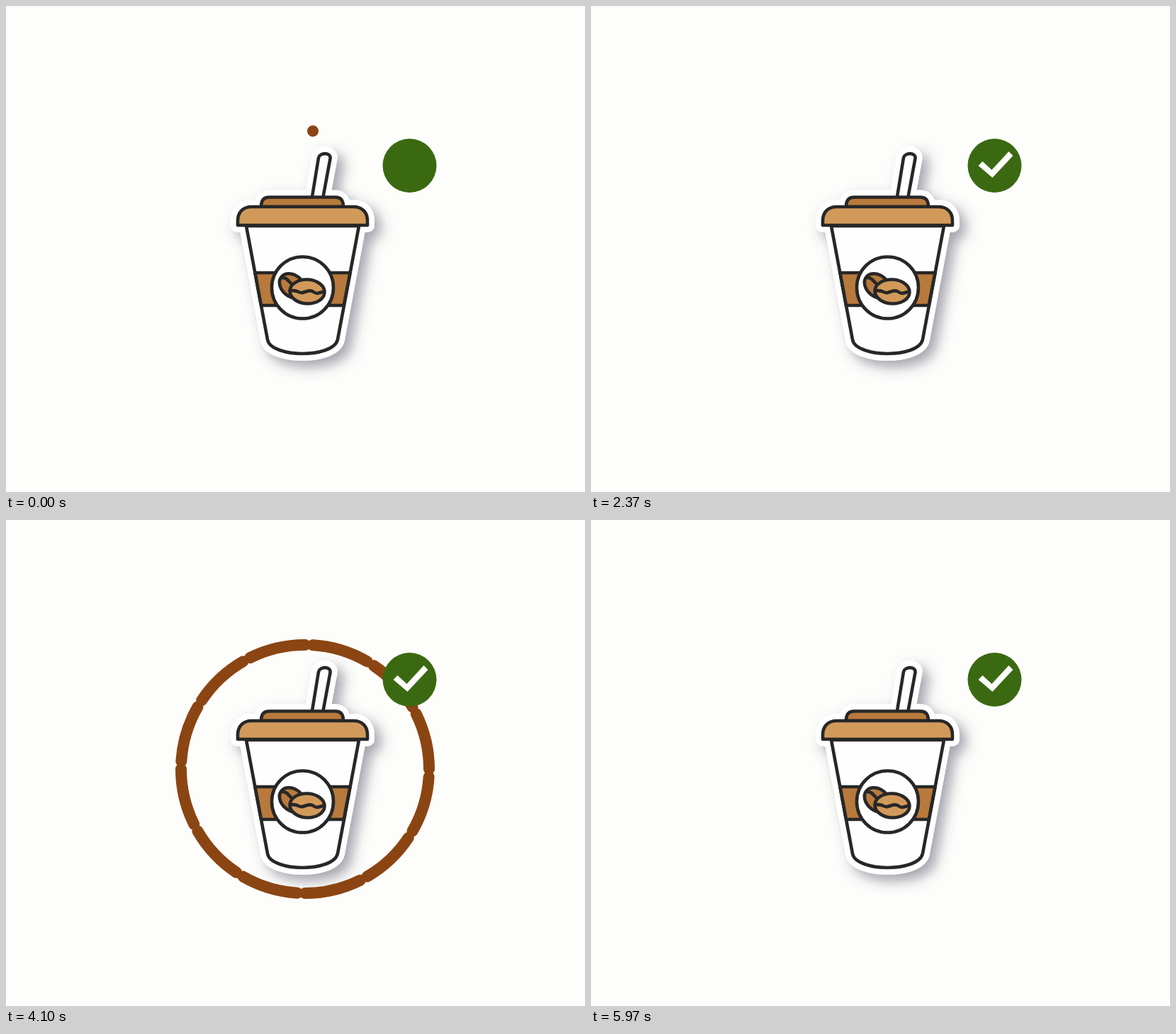
Write an HTML page that moves like this. It is 817 by 685 pixels and loops after 6010 ms.

```html
<!DOCTYPE html>
<html lang="en">
<head>
<meta charset="utf-8">
<title>Coffee order</title>
<style>
  html, body { margin: 0; width: 100%; height: 100%; overflow: hidden; background: #fdfdfb; }
  svg { display: block; width: 100vw; height: 100vh; }
  .sticker { fill: #fff; stroke: #fff; stroke-width: 20; stroke-linejoin: round; }
  .ink { stroke: #272727; stroke-width: 4.6; stroke-linejoin: round; stroke-linecap: round; }
  .white { fill: #fefefe; }
  .light { fill: #d29a5a; }
  .dark { fill: #b87a3c; }
</style>
</head>
<body>
<svg viewBox="0 0 817 685">
  <defs>
    <path id="straw" d="M432 269 L441 214 C443 206 459 206 457.500 215 L447.500 269"/>
    <path id="cap" d="M360 283 C360 274 364 269.500 371 269.500 H465 C472 269.500 476 274 476 283 Z"/>
    <path id="lid" d="M327 309 V303 C327 290 335 283 347 283 H490 C502 283 510 290 510 303 V309 Z"/>
    <path id="body" d="M339 310 L369 470 C371 484 398 490 418 490 C440 490 465 484 468 470 L498 310 Z"/>
    <filter id="shadow" x="-30%" y="-30%" width="170%" height="170%">
      <feDropShadow dx="9" dy="9" stdDeviation="9" flood-color="#4c4c60" flood-opacity=".5"/>
    </filter>
  </defs>

  <g class="sticker" filter="url(#shadow)">
    <use href="#straw"/><use href="#cap"/><use href="#lid"/><use href="#body"/>
  </g>
  <g class="ink">
    <use href="#straw" class="white"/>
    <use href="#cap" class="dark"/>
    <use href="#body" class="white"/>
    <path class="dark" d="M351.500 376 H485.500 L476.700 422 H360 Z"/>
    <use href="#lid" class="light"/>
    <circle class="white" cx="418.500" cy="397" r="43.500"/>
    <g transform="translate(404 394.500) rotate(40)">
      <ellipse class="dark" rx="20" ry="15"/>
      <path fill="none" d="M-19 1 C-11 -7 -4 3 8 -4"/>
    </g>
    <g transform="translate(425 402.500) rotate(3)">
      <ellipse class="light" rx="24.500" ry="17"/>
      <path fill="none" d="M-23 0 C-13 -2 -12 3 -7 2 S3 -4 9 0 S17 0 23 -1"/>
    </g>
  </g>

  <path id="ring" fill="none" stroke="#8b4513" stroke-linecap="round"/>
  <g id="badge">
    <circle r="38" fill="#3b6912"/>
    <path id="check" fill="#fdfdfb" d="M-23 0 L-17 -6 L-4 6 L20 -20 L26 -14 L-3 17 Z"/>
  </g>
</svg>
<script>
  const LOOP = 6010, CYCLE = 3005;
  const CENTER = { x: 422, y: 351 }, RADIUS = 175;
  const SEGMENTS = 12, STEP = 360 / SEGMENTS, GAP = 3.6;
  const [ring, badge, check] = ['ring', 'badge', 'check'].map(id => document.getElementById(id));

  const span = (t, from, to) => Math.min(1, Math.max(0, (t - from) / (to - from)));
  const smooth = x => x * x * (3 - 2 * x);

  // Angles run clockwise from the top.
  function point(deg) {
    const a = deg * Math.PI / 180;
    return `${(CENTER.x + RADIUS * Math.sin(a)).toFixed(3)} ${(CENTER.y - RADIUS * Math.cos(a)).toFixed(3)}`;
  }

  function arc(from, to) {
    return `M${point(from)}A${RADIUS} ${RADIUS} 0 0 1 ${point(Math.max(to, from + 0.02))}`;
  }

  function drawRing(t) {
    const front = GAP + (360 - GAP) * span(t, 20, 970) ** 2;
    const gap = GAP + (STEP - GAP) * smooth(span(t, 1456, 1581));
    const width = 16 * (1 - span(t, 1433, 1727));
    let d = '';
    for (let i = 0; i < SEGMENTS; i++) {
      const from = i * STEP + gap, to = (i + 1) * STEP;
      if (t > 1000 || front >= from) d += arc(from, t > 1000 ? to : Math.min(to, front));
    }
    ring.setAttribute('d', width > 0 ? d : '');
    ring.setAttribute('stroke-width', width);
  }

  function drawBadge(t) {
    const dip = smooth(span(t, 490, 690)) - smooth(span(t, 690, 880));
    badge.setAttribute('transform', `translate(569.500 225) scale(${1 - 0.2 * dip})`);
    check.setAttribute('transform', `scale(${smooth(span(t, 700, 900))})`);
  }

  function render(time) {
    const t = time % LOOP;
    drawRing(t % CYCLE);
    drawBadge(t);
  }

  const start = performance.now();
  function tick() {
    render(performance.now() - start);
    requestAnimationFrame(tick);
  }
  tick();
</script>
</body>
</html>
```
